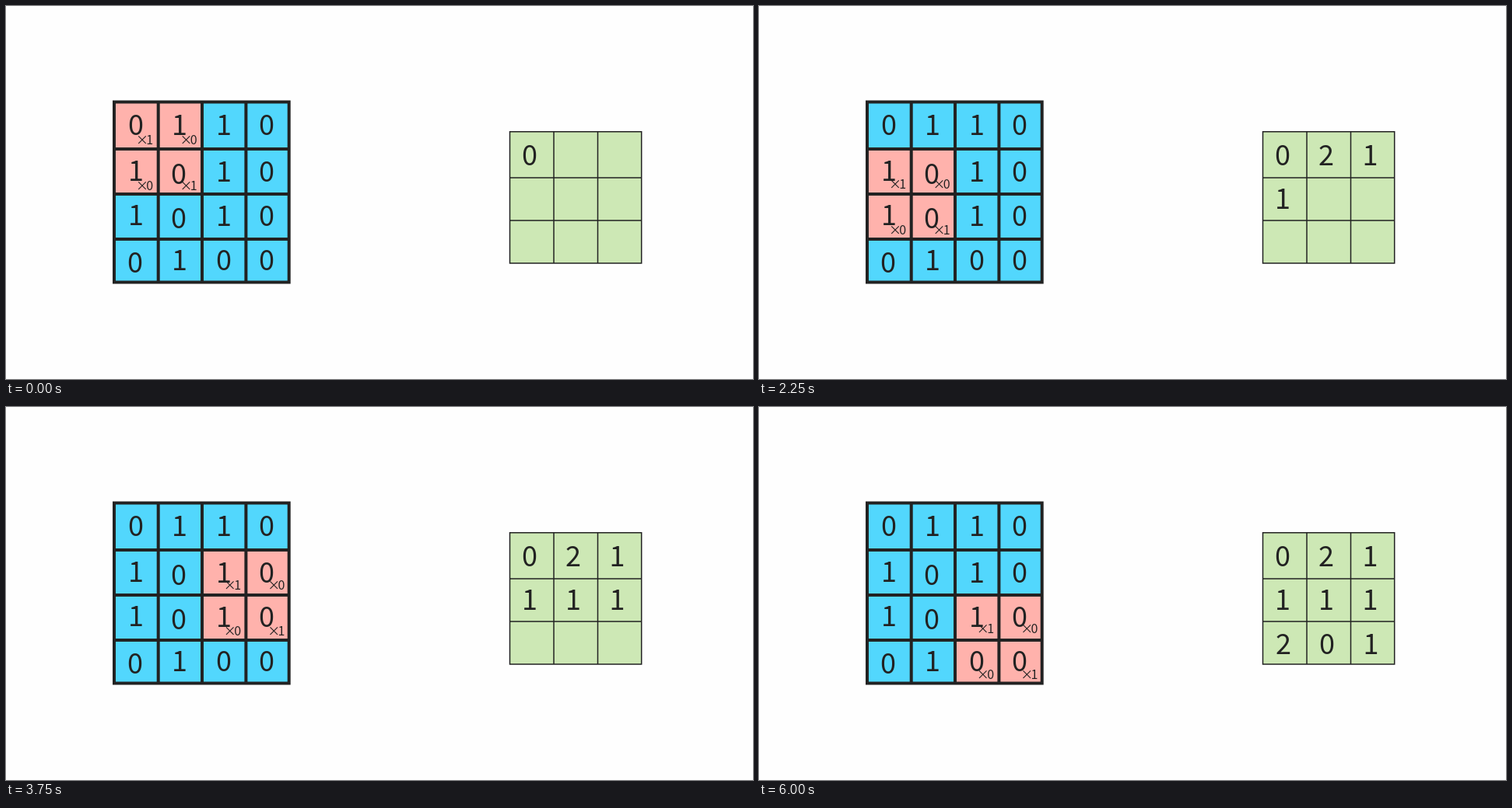
Animation, 960 px wide and 480 px high, one loop 6.75 s. Source, as an HTML page:

```html
<!DOCTYPE html>
<html lang="en">
<head>
<meta charset="utf-8">
<title>Convolution step by step</title>
<style>
  html, body { margin: 0; width: 100%; height: 100%; overflow: hidden; background: #fefefe; }
  svg { display: block; width: 960px; height: 480px; }
  text {
    font-family: "Noto Sans CJK SC", "Noto Sans CJK JP", "Noto Sans CJK", "Noto Sans", sans-serif;
    font-size: 36px; text-anchor: middle; fill: #222;
  }
  .small text { font-size: 16px; }
</style>
</head>
<body>
<svg id="stage" viewBox="0 0 960 480"></svg>
<script>
const STEP = 750;
const input = [[0, 1, 1, 0], [1, 0, 1, 0], [1, 0, 1, 0], [0, 1, 0, 0]];
const kernel = [[1, 0], [0, 1]];

const inX = [139, 195.7, 252, 308.4, 363.7], inY = [123.6, 184, 242, 300, 355.5];
const outX = [647.5, 704, 760.5, 816.7], outY = [161.7, 221, 276, 331];
const BLUE = "#52d7fd", PINK = "#ffb2ac", GREEN = "#cde8b5";

// Digit centres; some digits sit slightly off the grid
const inDigitX = [167, 223, 280, 335], inDigitY = [153, 213, 270, 327];
const nudge = { "1,0": [0, -1], "1,1": [-1, 3], "2,0": [0, -1], "2,1": [-1, 2.5], "3,0": [-1, 2.5] };
const outDigitX = [673, 729, 785.5], outDigitY = [192, 248, 305];

const stage = document.getElementById("stage");

function add(parent, tag, attrs, label) {
  const el = document.createElementNS("http://www.w3.org/2000/svg", tag);
  for (const key in attrs) el.setAttribute(key, attrs[key]);
  if (label !== undefined) el.textContent = label;
  parent.appendChild(el);
  return el;
}

function addCells(xs, ys, fill) {
  const cells = [];
  for (let r = 0; r < ys.length - 1; r++) {
    for (let c = 0; c < xs.length - 1; c++) {
      cells.push(add(stage, "rect", {
        x: xs[c], y: ys[r], width: xs[c + 1] - xs[c], height: ys[r + 1] - ys[r], fill
      }));
    }
  }
  return cells;
}

function addLines(xs, ys, width) {
  const x0 = xs[0], x1 = xs[xs.length - 1], y0 = ys[0], y1 = ys[ys.length - 1];
  const d = xs.map(x => `M${x} ${y0}V${y1}`).concat(ys.map(y => `M${x0} ${y}H${x1}`)).join("");
  add(stage, "path", { d, fill: "none", stroke: "#222", "stroke-width": width, "stroke-linecap": "square" });
}

const addDigit = (x, y, label) => add(stage, "text", { x, y: y + 13 }, label);

const inCells = addCells(inX, inY, BLUE);
addLines(inX, inY, 4);
input.forEach((row, r) => row.forEach((value, c) => {
  const [dx, dy] = nudge[r + "," + c] || [0, 0];
  addDigit(inDigitX[c] + dx, inDigitY[r] + dy, value);
}));

addCells(outX, outY, GREEN);
addLines(outX, outY, 1.5);
const results = [];
for (let r = 0; r < 3; r++) {
  for (let c = 0; c < 3; c++) {
    let sum = 0;
    kernel.forEach((row, i) => row.forEach((k, j) => sum += k * input[r + i][c + j]));
    results.push(addDigit(outDigitX[c] + (r === 2 ? 1 : 0), outDigitY[r], sum));
  }
}

const weights = add(stage, "g", { class: "small" });
kernel.forEach((row, i) => row.forEach((k, j) => {
  const x = 179 + j * 56.4, y = 178 + i * 59;
  add(weights, "text", { x: x - 4, y }, "×");
  add(weights, "text", { x: x + 5.8, y }, k);
}));

let shown = -1;
function draw(now) {
  const step = Math.floor(now / STEP) % 9;
  if (step !== shown) {
    shown = step;
    const row = Math.floor(step / 3), col = step % 3;
    inCells.forEach((cell, n) => {
      const r = Math.floor(n / 4) - row, c = n % 4 - col;
      const active = r >= 0 && r < 2 && c >= 0 && c < 2;
      cell.setAttribute("fill", active ? PINK : BLUE);
    });
    weights.setAttribute("transform", `translate(${col * 56.4} ${row * 56.5})`);
    results.forEach((el, n) => el.setAttribute("visibility", n <= step ? "visible" : "hidden"));
  }
}

const start = performance.now();
function tick() {
  draw(performance.now() - start);
  requestAnimationFrame(tick);
}
tick();
</script>
</body>
</html>
```
